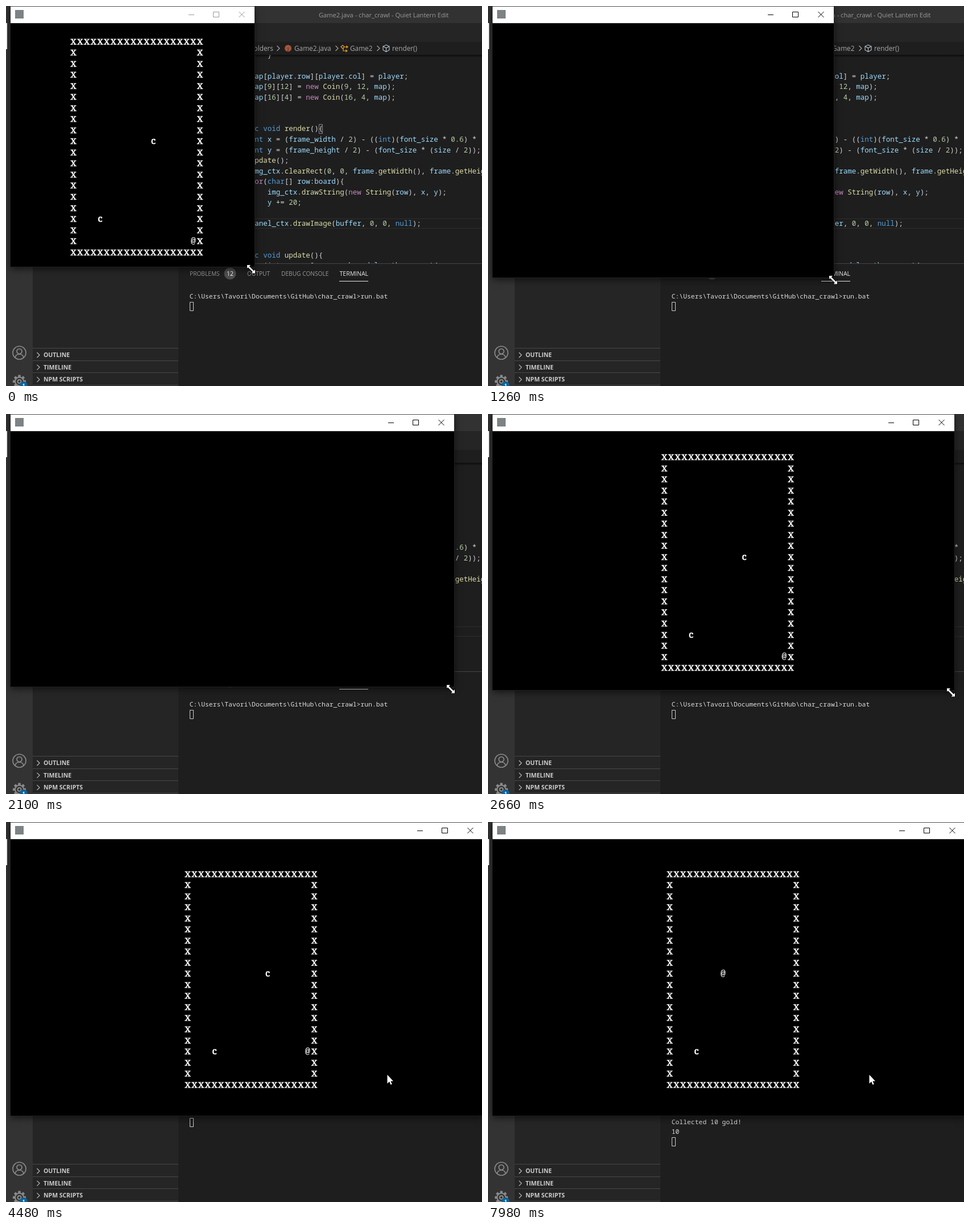
Write an HTML page with a canvas that moves like this. It is 837x669 px and loops after 8 s.

```html
<!DOCTYPE html>
<html lang="en">
<head>
<meta charset="utf-8">
<title>char_crawl</title>
<style>
html, body { margin: 0; width: 100%; height: 100%; overflow: hidden; background: #1e1e1e; }
canvas { display: block; }
</style>
</head>
<body>
<canvas id="stage" width="837" height="669"></canvas>
<script>
const ctx = document.getElementById('stage').getContext('2d');
const UI = '"Open Sans", "Noto Sans", sans-serif';
const MONO = '"Noto Sans Mono", "DejaVu Sans Mono", monospace';
const SERIF = '"Noto Serif", "Liberation Serif", serif';
const LOOP = 8000;

// [start ms, right edge, bottom edge, cursor lag]
const SIZES = [
  [0, 437, 460], [700, 470, 463], [840, 520, 468], [980, 570, 475],
  [1260, 608, 479, 5], [1400, 650, 479], [1540, 695, 478], [1680, 735, 477],
  [1820, 757, 478], [1960, 775, 479], [2100, 788, 481], [2240, 797, 483],
  [2380, 806, 485], [2520, 814, 486], [2660, 820, 487], [3220, 821, 487],
  [3360, 823, 487], [3500, 825, 488], [3780, 827, 488], [3920, 834, 503],
  [4060, 839, 518]
];
// [start ms, row, column]
const MOVES = [
  [0, 18, 18], [4340, 17, 18], [4480, 16, 18], [4760, 15, 18], [5040, 14, 18],
  [5180, 13, 18], [5320, 12, 18], [5460, 10, 18], [5880, 9, 18],
  [6300, 9, 17], [6440, 9, 16], [6580, 9, 15], [6720, 9, 14], [6860, 9, 13],
  [7000, 9, 12], [7560, 9, 11], [7840, 9, 9], [7980, 9, 8]
];
const COLLECTED = 7000;

// line number -> [indent in characters, code]
const CODE = {
  '-2': [4, '}'],
  0: [0, 'map[player.row][player.col] = player;'],
  1: [0, 'map[9][12] = new Coin(9, 12, map);'],
  2: [0, 'map[16][4] = new Coin(16, 4, map);'],
  5: [-4, 'public void render(){'],
  6: [0, 'int x = (frame_width / 2) - ((int)(font_size * 0.6) * (size / 2));'],
  7: [0, 'int y = (frame_height / 2) - (font_size * (size / 2));'],
  8: [0, 'update();'],
  9: [0, 'img_ctx.clearRect(0, 0, frame.getWidth(), frame.getHeight());'],
  10: [0, 'for(char[] row:board){'],
  11: [4, 'img_ctx.drawString(new String(row), x, y);'],
  12: [4, 'y += 20;'],
  14: [0, 'panel_ctx.drawImage(buffer, 0, 0, null);'],
  17: [-4, 'public void update(){'],
  18: [0, 'for(int row = 0; row < board.length; row++){']
};
const TOKEN = /\b(new|for)\b|\b(public|void|int|char|null)\b|(\d[\d.]*)|(\w+)(?=\()|(\w+)|([^\s\w]+)/g;
const TOKEN_COLORS = ['#c586c0', '#569cd6', '#b5cea8', '#dcdcaa', '#9cdcfe', '#d4d4d4'];

const at = (list, t) => list.filter(e => e[0] <= t).pop();

function rect(x, y, w, h, color) {
  ctx.fillStyle = color;
  ctx.fillRect(x, y, w, h);
}
function text(s, x, y, font, color, align = 'left') {
  ctx.font = font;
  ctx.fillStyle = color;
  ctx.textAlign = align;
  ctx.fillText(s, x, y);
}
function path(d, color, width = 1, dx = 0, dy = 0) {
  ctx.save();
  ctx.translate(dx, dy);
  ctx.strokeStyle = color;
  ctx.lineWidth = width;
  ctx.stroke(new Path2D(d));
  ctx.restore();
}
function disc(x, y, r, color) {
  ctx.fillStyle = color;
  ctx.beginPath();
  ctx.arc(x, y, r, 0, 7);
  ctx.fill();
}
const chevron = (x, y, color) => path('M-2.5-4.5L2-0L-2.5 4.5', color, 1.1, x, y);

function drawCode() {
  ctx.save();
  ctx.beginPath();
  ctx.rect(303, 86, 534, 367);
  ctx.clip();
  rect(303, 374, 534, 1, '#2d2d2d');
  rect(303, 391, 534, 1, '#2d2d2d');
  for (const n in CODE) {
    const [indent, line] = CODE[n];
    for (const m of line.matchAll(TOKEN)) {
      const kind = m.slice(1).findIndex(g => g !== undefined);
      text(m[0], 429.7 + (indent + m.index) * 7.5, 127.8 + n * 18.53,
        '12.5px ' + MONO, TOKEN_COLORS[kind]);
    }
  }
  path('M550.5 208.5h6v16h-6z', '#888');
  const shade = ctx.createLinearGradient(0, 86, 0, 91);
  shade.addColorStop(0, 'rgba(0,0,0,.6)');
  shade.addColorStop(1, 'rgba(0,0,0,0)');
  rect(303, 86, 534, 5, shade);
  ctx.restore();
}

function drawBreadcrumbs() {
  const font = '11.8px ' + UI, grey = '#a9a9a9';
  text('olders', 470, 78.5, font, grey, 'right');
  chevron(479, 74.5, grey);
  disc(496, 74.5, 6, '#a5543c');
  text('J', 496, 77.5, '8px ' + UI, '#1e1e1e', 'center');
  text('Game2.java', 507, 78.5, font, grey);
  chevron(582, 74.5, grey);
  path('M1 3l3-3 3 3-3 3zM7 3h4M5 5v5h5M11 1.5l2 1.5-2 1.5zM10 8.5l2 1.5-2 1.5z', '#ee9d28', 1.2, 588, 69);
  text('Game2', 605, 78.5, font, grey);
  chevron(655, 74.5, grey);
  path('M0-6l5.5 2.5v6.5L0 6l-5.5-3v-6.5zM-5.5-3.5L0-.5 5.5-3.5M0-.5V6', '#b8c4cc', 1.1, 668.5, 74.5);
  text('render()', 679, 78.5, font, grey);
}

function drawPanel(t) {
  rect(303, 453, 534, 216, '#1e1e1e');
  rect(303, 453, 534, 1, '#454545');
  const font = '10.2px ' + UI, grey = '#979797';
  text('PROBLEMS', 323, 475, font, grey);
  disc(394, 471, 10.5, '#4d4d4d');
  text('12', 394, 474.8, '10.4px ' + UI, '#fff', 'center');
  text('OUTPUT', 424, 475, font, grey);
  text('DEBUG CONSOLE', 484, 475, font, grey);
  text('TERMINAL', 586.5, 475, '10.5px ' + UI, '#e7e7e7');
  rect(586, 484, 51, 1, '#e7e7e7');

  const done = t >= COLLECTED;
  const lines = ['C:\\Users\\Tavori\\Documents\\GitHub\\char_crawl>run.bat'];
  if (done) lines.push('Collected 10 gold!', '10');
  lines.forEach((s, i) => text(s, 322.7, 515.3 + i * 17, '11.4px ' + MONO, '#dcdcdc'));
  path('M323.5 521.5h6v15h-6z', '#ccc', 1, 0, done ? 34 : 0);
}

function drawSidebar() {
  rect(0, 30, 47, 639, '#333');
  rect(47, 30, 256, 639, '#252526');
  rect(0, 30, 2, 46, '#fff');
  ['OUTLINE', 'TIMELINE', 'NPM SCRIPTS'].forEach((s, i) => {
    const y = 614 + i * 21.6;
    rect(47, Math.round(y - 12), 256, 1, '#474747');
    chevron(57, y + 0.5, '#c5c5c5');
    text(s, 66, y + 4, 'bold 10.5px ' + UI, '#ccc');
  });
  rect(47, 667, 256, 1, '#474747');

  const grey = '#8a8a8a';
  path('M11.5 0a11.5 11.5 0 1 1-23 0a11.5 11.5 0 1 1 23 0M4.5-2.5a4.5 4.5 0 1 1-9 0a4.5 4.5 0 1 1 9 0M-7.5 8.5C-6 .5 6 .5 7.5 8.5',
    grey, 1.7, 23.5, 610.5);
  ctx.save();
  ctx.translate(23.5, 661);
  for (let i = 0; i < 8; i++) {
    ctx.rotate(Math.PI / 4);
    rect(-2.2, -11.5, 4.4, 4, grey);
  }
  ctx.restore();
  path('M7.5 0a7.5 7.5 0 1 1-15 0a7.5 7.5 0 1 1 15 0M3 0a3 3 0 1 1-6 0a3 3 0 1 1 6 0', grey, 2, 23.5, 661);
  disc(31, 668, 7, '#0e639c');
  text('1', 31, 671, 'bold 8px ' + UI, '#fff', 'center');
}

function drawEditor(t) {
  rect(0, 0, 837, 669, '#1e1e1e');
  drawCode();
  rect(0, 0, 837, 30, '#323233');
  rect(303, 30, 534, 33, '#252526');
  text('Game2.java - char_crawl - Quiet Lantern Edit', 550, 19.5, '11.1px ' + UI, '#9a9a9a');
  drawBreadcrumbs();
  drawPanel(t);
  drawSidebar();
}

function drawMap(t, right, bottom) {
  const left = (8 + right) / 2 - 109.7, top = bottom / 2 - 167.6;
  // a thin outline evens out the strokes of the letters
  const put = (ch, row, col, font, drop, outline) => {
    const x = left + (col + 0.5) * 11.7, y = top + row * 19.52 + drop;
    text(ch, x, y, font, '#fff', 'center');
    ctx.strokeStyle = '#fff';
    ctx.lineWidth = outline;
    ctx.strokeText(ch, x, y);
  };
  const wall = '15.3px ' + SERIF, coin = '16.5px ' + SERIF;
  for (let i = 0; i < 20; i++) {
    for (const edge of [0, 19]) {
      put('X', edge, i, wall, 5.3, 0.7);
      if (i % 19) put('X', i, edge, wall, 5.3, 0.7);
    }
  }
  if (t < COLLECTED) put('c', 9, 12, coin, 5.3, 0.7);
  put('c', 16, 4, coin, 5.3, 0.7);
  const [, row, col] = at(MOVES, t);
  put('@', row, col, '14.5px "Liberation Mono", monospace', 3.8, 0.2);
}

function drawWindow(t, right, bottom) {
  ctx.save();
  ctx.shadowColor = 'rgba(0,0,0,.6)';
  ctx.shadowBlur = 12;
  ctx.shadowOffsetY = 3;
  rect(8, 0, right - 8, bottom, '#000');
  ctx.restore();
  rect(8, 0, right - 8, 1, '#4a4a4a');
  rect(8, 1, right - 8, 29.2, '#fff');
  path(`M7.5.5V${bottom - 0.5}H${right + 0.5}V.5`, '#222');
  rect(16, 7, 15, 15, '#7d8284');
  path('M-116 15.5h10M-72.5 10.5h10v9h-10zM-27.5 10l10 10M-17.5 10l-10 10',
    t < 420 ? '#999' : '#000', 1, right, 0);
  const cleared = t >= 700 && t < 2520;
  if (!cleared) drawMap(t, right, bottom);
}

function drawCursor(t, x, y) {
  const arrow = t >= 4060;
  const shape = new Path2D(arrow
    ? 'M0 0V15.5L3.6 12L6 17.5L8.2 16.5L6 11.2H10.5z'
    : 'M-7-7.5h6l-2.2 2.2 8 8L7 .5v6.5H.5l2.3-2.3-8-8L-7-1.5z');
  ctx.save();
  ctx.translate(...(arrow ? [670.5, 445] : [x, y]));
  ctx.strokeStyle = '#000';
  ctx.lineWidth = 1.6;
  ctx.stroke(shape);
  ctx.fillStyle = '#fff';
  ctx.fill(shape);
  ctx.restore();
}

function draw() {
  const t = performance.now() % LOOP;
  const [, right, bottom, lag = 0] = at(SIZES, t);
  drawEditor(t);
  drawWindow(t, right, bottom);
  drawCursor(t, right - 6 + lag, bottom + 3.5);
  requestAnimationFrame(draw);
}
draw();
</script>
</body>
</html>
```
